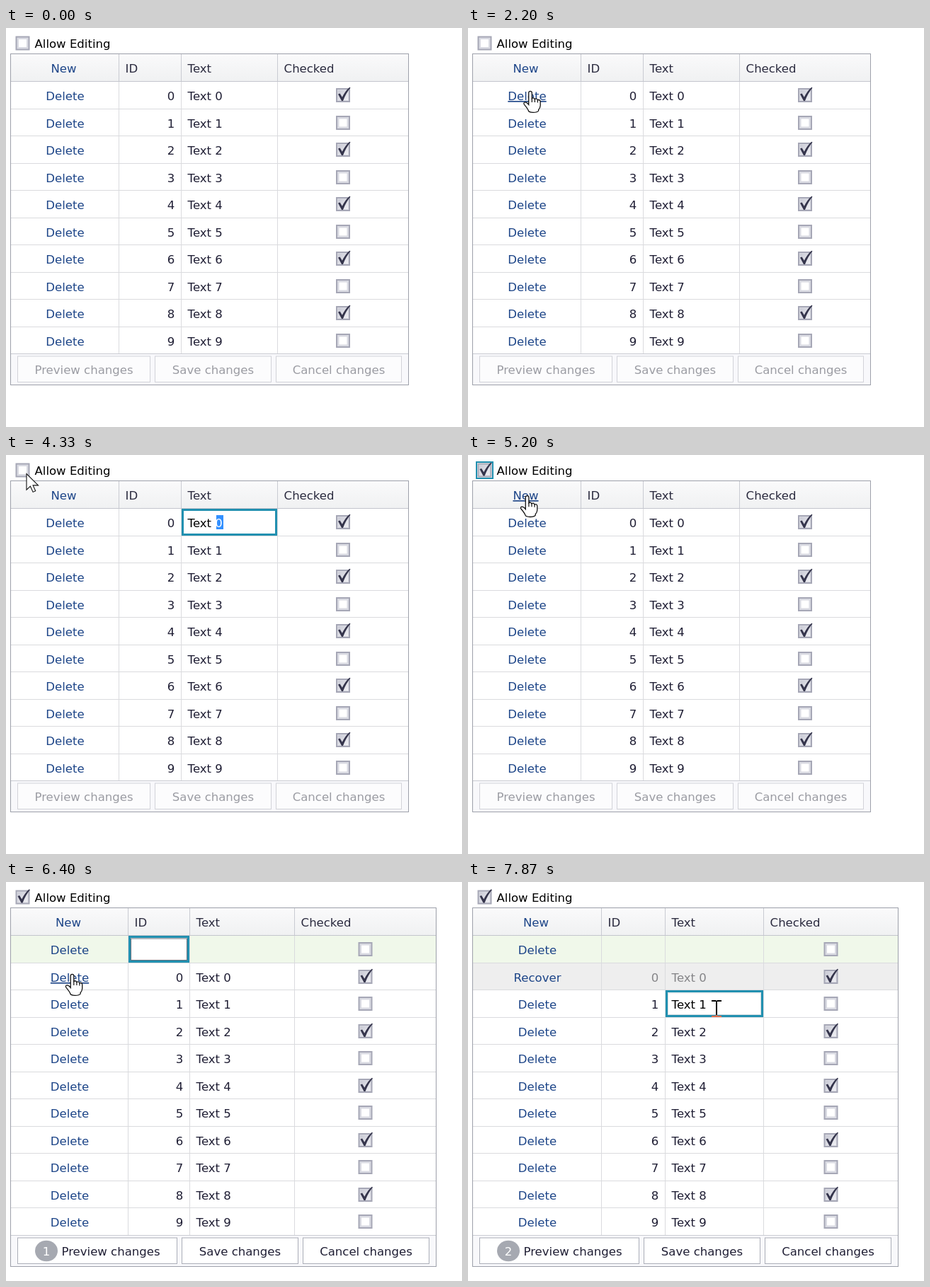
Animation of 644 by 564 pixels, one loop 8 s. Source, as an HTML page:

```html
<!DOCTYPE html>
<html lang="en">
<head>
<meta charset="utf-8">
<title>Editable grid</title>
<style>
html, body { margin: 0; width: 100%; height: 100%; overflow: hidden; background: #fff; }
svg { display: block; width: 644px; height: 564px; font: 16.55px "DejaVu Sans", Verdana, sans-serif; }
.ibeam { mix-blend-mode: difference; }
</style>
</head>
<body>
<svg id="stage" viewBox="0 0 644 564" xmlns="http://www.w3.org/2000/svg">
  <defs>
    <linearGradient id="head" x2="0" y2="1"><stop stop-color="#fafafb"/><stop offset="1" stop-color="#f0f1f2"/></linearGradient>
    <linearGradient id="tick" x2="1" y2="1"><stop stop-color="#c9cad5"/><stop offset="1" stop-color="#f1f1f5"/></linearGradient>
  </defs>
  <rect width="644" height="564" fill="#fff"/>
  <g id="grid"></g>
  <g id="cursor"></g>
</svg>
<script>
const LOOP = 8000, PITCH = 38.5;
const INK = '#201f35', LINK = '#1d4588', TEAL = '#2190b0', EDGE = '#9da0aa';
const grid = document.getElementById('grid'), cursor = document.getElementById('cursor');

// Events on the timeline
const AT = { show: 330, edit: 3530, select: 3600, allow: 4670, add: 5670, drop: 6670, mark: 6930, retype: 7600, close: 7870 };

const ease = {
  linear: u => u,
  smooth: u => u * u * (3 - 2 * u),
  out: u => 1 - (1 - u) * (1 - u)
};

// Pointer path: time, x, y, easing into the point
const path = [
  [270, 130, 497], [1130, 24, 20], [1200, 24, 19], [1330, 24, 19], [1400, 24, 22],
  [2200, 88, 89], [2400, 86, 59], [2530, 86, 59], [2800, 88, 93], [2930, 88, 93],
  [3070, 211.5, 104, 'linear'], [3600, 302, 97, 'out'], [3800, 302, 97], [4330, 28.5, 26],
  [4400, 22, 22, 'linear'], [4470, 28, 19, 'linear'], [4800, 28, 19], [5330, 93.5, 64],
  [5670, 93.5, 64], [6400, 93.5, 130], [6870, 93.5, 130], [7600, 351, 178]
];

function pointer(t) {
  let a = path[0];
  for (const b of path) {
    if (t < b[0]) {
      const u = ease[b[3] || 'smooth'](Math.max(0, (t - a[0]) / (b[0] - a[0] || 1)));
      return { x: a[1] + (b[1] - a[1]) * u, y: a[2] + (b[2] - a[2]) * u };
    }
    a = b;
  }
  return { x: a[1], y: a[2] };
}

const rect = (x, y, w, h, fill, extra = '') =>
  `<rect x="${x}" y="${y}" width="${w}" height="${h}" fill="${fill}" ${extra}/>`;
const frame = (x, y, w, h, fill, stroke, sw = 1) =>
  rect(x + sw / 2, y + sw / 2, w - sw, h - sw, fill, `stroke="${stroke}" stroke-width="${sw}"`);
const text = (x, y, s, fill, anchor = 'start', extra = '') =>
  `<text x="${x}" y="${y}" fill="${fill}" text-anchor="${anchor}" xml:space="preserve" ${extra}>${s}</text>`;

function checkbox(cx, cy, on) {
  const x = cx - 10, y = cy - 10;
  let s = frame(x, y, 20, 20, '#d9dae2', '#a6a7b6', 2);
  if (on) {
    s += rect(x + 3, y + 3, 14, 14, 'url(#tick)') +
      `<path d="M${cx - 7} ${cy - 1.5}l2.6-1 3.2 5.3Q${cx + 3} ${cy - 6} ${cx + 9.2} ${cy - 11.3}l1.3.8Q${cx + 4} ${cy - 3} ${cx} ${cy + 8}h-2z" fill="#35354c"/>`;
  } else {
    s += rect(x + 4.5, y + 4.5, 11, 11, '#fff');
  }
  return s;
}

const link = (x, y, s, hot) =>
  text(x, y, s, LINK, 'middle', hot ? 'text-decoration="underline"' : '');

function editor(x, y, w, inner) {
  return frame(x, y, w, 38, '#fff', TEAL, 3) +
    (inner ? frame(x + 3, y + 3.5, w - 6, 31.5, 'none', inner) : '');
}

function button(x, y, w, label, on, left) {
  return frame(x, y, w, 37.5, on ? '#fff' : '#fcfcfd', on ? '#abaeb8' : '#d2d3d9') +
    text(left || x + w / 2, y + 25, label, on ? INK : '#9b9ca3', left ? 'start' : 'middle');
}

function layout(t) {
  if (t < AT.add) return { cols: [159, 247, 383], right: 568 };
  if (t < AT.drop) return { cols: [172, 259, 407], right: 607 };
  return { cols: [188, t < AT.close ? 275 : 278, 417], right: 607 };
}

const shift = k => Math.floor(k * PITCH + 0.5);
const lineY = k => Math.floor(75.9 + k * PITCH);

function drawGrid(t, p) {
  const { cols: [c1, c2, c3], right } = layout(t);
  const added = t >= AT.add, dropped = t >= AT.drop;
  const ids = [...Array(10).keys()];
  if (added) ids.unshift(null);
  const n = ids.length, foot = lineY(n), mid = (7 + c1) / 2 + 0.5;
  const over = (x, base, half) =>
    t >= AT.show && Math.abs(p.x - x) < half && p.y > base - 16 && p.y < base + 5;
  let hand = false, beam = false;

  let s = checkbox(23.5, 21.5, t >= AT.allow);
  if (t >= AT.allow && t < 5530) s += frame(11, 9, 25, 25, 'none', TEAL, 2);
  s += text(40.5, 28, 'Allow Editing', '#000');

  s += rect(7, 37, right - 7, 38, 'url(#head)');
  const hotNew = over(mid - 2, 63, 18);
  hand = hotNew;
  s += link(mid - 2, 63, 'New', hotNew);
  ['ID', 'Text', 'Checked'].forEach((h, i) => { s += text([c1, c2, c3][i] + 9.6, 63, h, '#2b2b3f'); });

  ids.forEach((id, k) => {
    const top = lineY(k) + 1, h = lineY(k + 1) - top, base = 102 + shift(k);
    const gone = id === 0 && t >= AT.mark;
    if (id === null) s += rect(7, top, right - 7, h, '#f0f8ea');
    if (gone) s += rect(7, top, right - 7, h, '#eee');
  });

  for (let k = 1; k <= n; k++) s += rect(7, lineY(k), right - 7, 1, '#dadbde');
  for (const c of [c1, c2, c3]) s += rect(c, 76, 1, foot - 76, '#dadbde') + rect(c, 37, 1, 38, '#c9cbd2');
  s += rect(7, 75, right - 7, 1, '#c3c5cd');

  ids.forEach((id, k) => {
    const top = lineY(k) + 1, base = 102 + shift(k);
    const ink = id === 0 && t >= AT.mark ? '#858588' : INK;
    const name = id === 0 && dropped ? 'Recover' : 'Delete';
    const hot = over(mid, base, 27);
    hand = hand || hot;
    s += link(mid, base, name, hot);
    s += checkbox((c3 + right) / 2 + 0.5, 95 + shift(k), id !== null && id % 2 === 0);
    if (id === null) {
      if (t < AT.close) s += editor(c1 + 1, top, c2 - c1 - 1, '#66707c');
      return;
    }
    s += text(c2 - 8.6, base, id, ink, 'end');
    const editing = id === 0 ? t >= AT.edit && t < AT.allow : id === 1 && t >= AT.retype;
    let label = 'Text ' + id;
    if (editing) {
      s += editor(c2 + 1, top, c3 - c2 - 1, id ? '#d5dde2' : '');
      beam = beam || (p.x > c2 && p.x < c3 && p.y > top && p.y < top + 38);
      if (id === 0 && t >= AT.select) {
        s += rect(c2 + 50, top + 9, 10, 20, '#3390ff');
        label = 'Text <tspan fill="#fff">0</tspan>';
      }
    }
    s += text(c2 + 9.6, base, label, editing ? '#000' : ink);
  });

  s += rect(7, foot + 1, right - 7, 43, '#f8f8fb') + rect(7, foot, right - 7, 1, '#c9cbd2');
  const by = foot + 3.5;
  if (added) {
    s += button(16, by, 226, 'Preview changes', true, 78.5) + button(248, by, 165, 'Save changes', true) +
      button(419, by, 179, 'Cancel changes', true);
    const show = Math.min(1, Math.max(0, (t - AT.add) / 400));
    s += `<g opacity="${show}"><ellipse cx="57" cy="521.5" rx="16" ry="14.7" fill="#a6a9b1"/>` +
      text(57, 528, t >= AT.mark ? 2 : 1, '#fff', 'middle') + '</g>';
  } else {
    s += button(16, by, 188, 'Preview changes') + button(210, by, 165, 'Save changes') +
      button(381, by, 178, 'Cancel changes');
  }
  s += frame(6, 36, right - 5, foot + 9 - 0, 'none', EDGE).replace(/height="[^"]*"/, `height="${foot + 44 - 36}"`);
  grid.innerHTML = s;
  return beam ? 'beam' : hand ? 'hand' : 'arrow';
}

const shapes = {
  arrow: '<path d="M.5.5V23.2L5.9 18.2 9.6 26.4 13.2 24.8 9.6 16.9H17Z" fill="#fff" stroke="#111" stroke-width="1.1"/>',
  hand: '<path d="M-2.3 18V2.6Q-2.3.4 0 .4T2.3 2.6V10.6Q4.6 8.6 6.4 11.6 8.8 9.8 10.4 12.8 14 11.6 14.2 15.4V20.5Q14 24 11.6 26.5V28Q10 30.3 4 30.3T-2.6 28Q-3.2 25.5-8.8 18.8-9.8 16.6-7.8 16-5.2 15.6-2.3 19.4Z" fill="#fff" stroke="#111" stroke-width="1.3"/>' +
    '<path d="M2.3 10.6V16M6.4 11.6V16M10.4 12.8V16.5" fill="none" stroke="#111" stroke-width="1.2"/>',
  beam: '<path d="M-7-11H-1L0-10 1-11H7V-9H1V11H7V13H-7V11H-1V-9H-7Z" fill="#fff"/>'
};

let last = -1;
function tick(now) {
  const step = Math.floor((now % LOOP + 4) * 15 / 1000);
  if (step !== last) {
    last = step;
    const t = Math.round(step * 20 / 3) * 10 % LOOP;
    const p = pointer(t), kind = drawGrid(t, p);
    cursor.innerHTML = t < AT.show ? '' : shapes[kind];
    cursor.setAttribute('class', kind === 'beam' ? 'ibeam' : '');
    cursor.setAttribute('transform', `translate(${p.x.toFixed(1)} ${p.y.toFixed(1)})`);
  }
}

const start = performance.now();
function run() {
  tick(performance.now() - start);
  requestAnimationFrame(run);
}
run();
</script>
</body>
</html>
```
